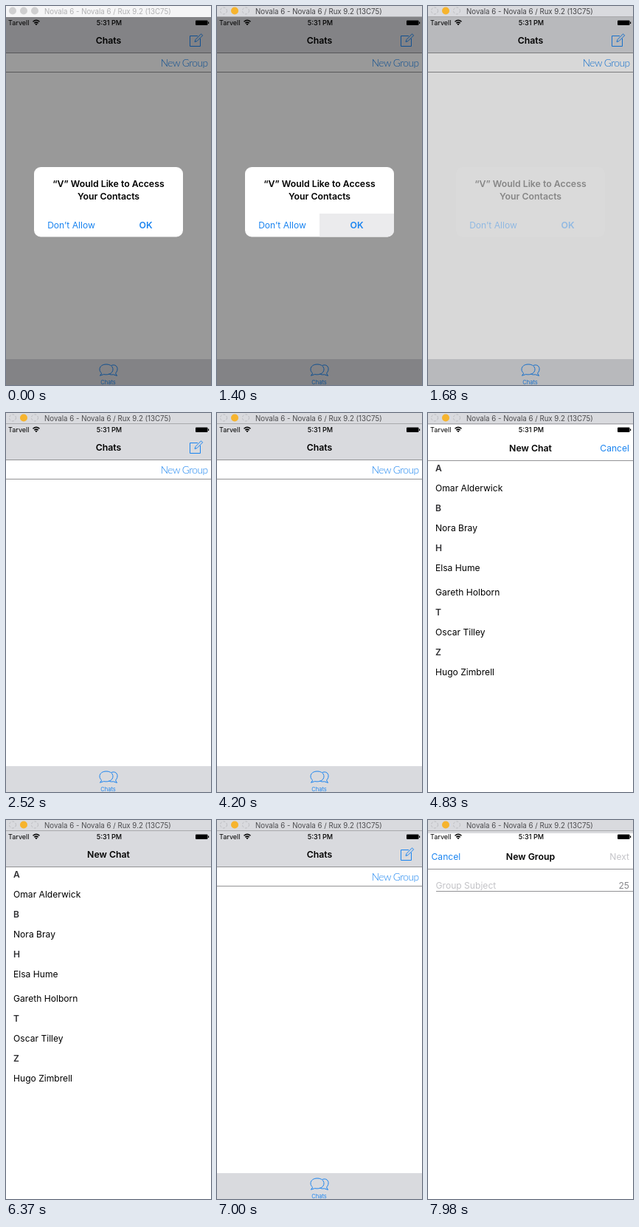
Write an HTML page that moves like this. It is 278 px wide and 513 px high and loops after 8000 ms.

```html
<!DOCTYPE html>
<html lang="en">
<head>
<meta charset="utf-8">
<title>Chat prototype</title>
<style>
  html, body { margin: 0; width: 100%; height: 100%; overflow: hidden; background: #fff; }
  svg { display: block; width: 278px; height: 513px; font: 400 12.1px Inter, Roboto, sans-serif; }
  .bold { font-weight: 600; font-size: 12.3px; }
  .mid { text-anchor: middle; }
  .end { text-anchor: end; }
  .blue { fill: #1a84f0; }
  .bar { fill: #d9dade; }
  .paper { fill: #fff; }
  .rule { stroke: #929295; stroke-width: 1; }
  .icon { fill: none; stroke: #1a84f0; stroke-width: 1; stroke-linejoin: round; }
  .status { font-size: 9.1px; }
  .caption { font-size: 9.7px; }
  .tab { font-size: 7.5px; }
  .link { font: 300 13.8px Lato, "Open Sans", sans-serif; letter-spacing: -.55px; }
  .section { font-weight: 600; fill: #303033; }
  .hint { fill: #c3c3c7; }
</style>
</head>
<body>
<svg viewBox="0 0 278 513">
  <rect class="paper" width="278" height="513"/>

  <g id="chats">
    <rect class="bar" y="15" width="278" height="48"/>
    <path class="rule" d="M0 63.5H278M0 89.5H278"/>
    <text class="bold mid" x="139" y="51">Chats</text>
    <g id="compose" class="icon">
      <path d="M260 40.5H249.5V54.5H263.5V44"/>
      <path d="M256 48.5L257 45.5L264.5 37.8L266.7 39.8L259 47.5Z"/>
    </g>
    <text class="link blue end" x="273.5" y="82">New Group</text>
    <rect class="bar" y="478" width="278" height="35"/>
    <g class="icon">
      <path d="M143 486.5C148 484.5 151.5 488 151 492C150.8 494.5 149.5 496 148.5 497L150.5 500.5L145.5 498.8C143 499.3 141 499 139.5 498"/>
      <path d="M136 485C130.5 485 127 488 127 491.8C127 494 128 495.8 129.7 497L127.5 500.3L132.5 498.6C140 500 145 496.5 145 491.8C145 488 141.5 485 136 485Z"/>
    </g>
    <text class="tab blue mid" x="138.5" y="512">Chats</text>
  </g>

  <g id="newChat">
    <rect class="paper" y="15" width="278" height="498"/>
    <rect id="chatBar" class="bar" y="15" width="278" height="48"/>
    <path class="rule" d="M0 63.5H278"/>
    <text class="bold mid" x="139" y="51">New Chat</text>
    <text id="cancel" class="blue end" x="273" y="51.3">Cancel</text>
    <g id="people"></g>
  </g>

  <g id="newGroup">
    <rect class="paper" y="15" width="278" height="498"/>
    <path class="rule" d="M0 63.5H278M11 93.5H278"/>
    <text class="blue" x="4.5" y="51">Cancel</text>
    <text class="bold mid" x="139" y="51">New Group</text>
    <text class="hint end" x="273" y="51">Next</text>
    <text class="hint" x="10.5" y="90">Group Subject</text>
    <text class="end" x="273" y="90" fill="#87878b">25</text>
  </g>

  <g class="status">
    <text x="3" y="26">Tarvell</text>
    <path d="M36.5 21.3Q41 17.3 45.5 21.3M38.3 23.3Q41 20.9 43.7 23.3" fill="none" stroke="#000" stroke-width="1.5"/>
    <path d="M39.3 24.3Q41 23 42.7 24.3L41 26.2Z"/>
    <text class="mid" x="140" y="26" font-weight="500">5:31 PM</text>
    <rect x="257" y="19.5" width="16.5" height="6.5" rx="1"/>
    <rect x="274" y="21.5" width="1.2" height="2.5"/>
  </g>

  <rect id="dim" y="15" width="278" height="498"/>
  <g id="panel">
    <rect class="paper" x="38" y="218" width="202" height="94.5" rx="9"/>
    <path id="press" d="M139 281H240V303.5A9 9 0 0 1 231 312.5H139Z" fill="#ebebed"/>
  </g>
  <g id="words">
    <text class="bold mid" x="139" y="245">“V” Would Like to Access</text>
    <text class="bold mid" x="139" y="261.5">Your Contacts</text>
    <text class="blue mid" x="88.5" y="300.5">Don’t Allow</text>
    <text class="bold blue mid" x="189.5" y="300.5">OK</text>
  </g>

  <rect id="titleBar" width="278" height="15"/>
  <path id="titleEdge" d="M0 14.5H278" stroke="#a9a9ac"/>
  <g id="idle" fill="#cfcfd0">
    <circle cx="9" cy="6.5" r="5"/><circle cx="24" cy="6.5" r="5"/><circle cx="39" cy="6.5" r="5"/>
  </g>
  <g id="active">
    <g fill="none" stroke="#bcbdc1" stroke-dasharray="3 2">
      <circle cx="9" cy="6.5" r="4.5"/><circle cx="39" cy="6.5" r="4.5"/>
    </g>
    <circle cx="24" cy="6.5" r="5" fill="#f6b42e"/>
  </g>
  <text id="caption" class="caption" x="52" y="10.5">Novala 6 - Novala 6 / Rux 9.2 (13C75)</text>
</svg>

<script>
(() => {
  const LOOP = 8000, STEP = 70, TRAVEL = 498;
  const el = id => document.getElementById(id);
  const clamp = v => Math.min(1, Math.max(0, v));
  const show = (id, on) => { el(id).style.display = on ? '' : 'none'; };
  const fade = (id, v) => { el(id).style.opacity = v; };

  const contacts = [
    ['A', 'Omar Alderwick'], ['B', 'Nora Bray'], ['H', 'Elsa Hume', 'Gareth Holborn'],
    ['T', 'Oscar Tilley'], ['Z', 'Hugo Zimbrell']
  ];

  function addText(parent, y, label, cls) {
    const node = document.createElementNS('http://www.w3.org/2000/svg', 'text');
    node.setAttribute('x', 10);
    node.setAttribute('y', y);
    node.setAttribute('class', cls);
    node.textContent = label;
    parent.append(node);
  }

  function listContacts() {
    let y = 64;
    for (const [letter, ...names] of contacts) {
      addText(el('people'), y + 14.3, letter, 'section');
      y += 21;
      for (const name of names) {
        addText(el('people'), y + 19.8, name, '');
        y += 33;
      }
    }
  }

  // Critically damped spring: 1 at rest, falling to 0 after the start.
  function spring(t, start) {
    const x = Math.max(0, t - start) * 0.0175;
    return (1 + x) * Math.exp(-x);
  }

  function place(id, rest) {
    const y = Math.round(TRAVEL * rest);
    show(id, y < TRAVEL - 1);
    el(id).setAttribute('transform', `translate(0 ${y})`);
  }

  // The screen refreshes once per STEP.
  function draw(time) {
    const t = Math.floor(time / STEP) * STEP;
    const focused = t >= 1400;

    show('idle', !focused);
    show('active', focused);
    show('titleEdge', focused);
    el('titleBar').setAttribute('fill', focused ? '#d9dade' : '#f5f5f6');
    el('caption').setAttribute('fill', !focused ? '#b0b0b2' : t < 2520 ? '#434346' : '#4b4b4e');

    const left = t < 1960 ? spring(t, 1560) : 0;
    fade('dim', 0.4 * left);
    fade('panel', left ** 3);
    fade('words', left);
    show('press', focused && t < 1610);

    show('compose', t < 4200 || t >= 5110);
    place('newChat', t < 6580 ? spring(t, 4330) : 1 - spring(t, 6510));
    fade('chatBar', clamp((t - 4830) / 280));
    show('cancel', t < 6370);
    place('newGroup', spring(t, 7562));
  }

  function tick() {
    draw(performance.now() % LOOP);
    requestAnimationFrame(tick);
  }

  listContacts();
  tick();
})();
</script>
</body>
</html>
```
